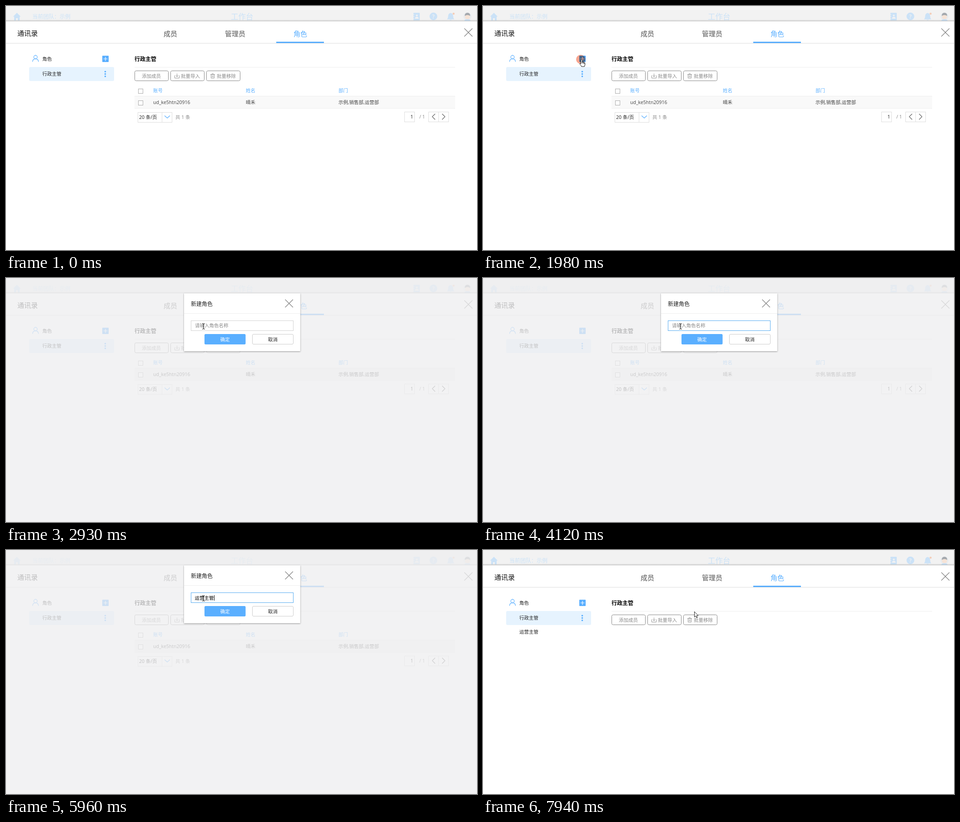
Recreate the animation shown at these times as an HTML page. Size 1037 by 540 pixels, loop 8000 ms.

```html
<!DOCTYPE html>
<html lang="zh-CN">
<head>
<meta charset="utf-8">
<title>新建角色</title>
<style>
html, body { margin: 0; width: 100%; height: 100%; overflow: hidden; background: #fff; }
svg { display: block; width: 1037px; height: 540px; font-family: "Open Sans", "Noto Sans CJK SC", "Noto Sans CJK", sans-serif; }
text { white-space: pre; }
.line { fill: none; stroke-linecap: round; stroke-linejoin: round; }
#ripple { mix-blend-mode: multiply; }
</style>
</head>
<body>
<svg id="stage" viewBox="0 0 1037 540">
  <defs>
    <linearGradient id="edge" x2="0" y2="1">
      <stop stop-color="#888" stop-opacity="0"/><stop offset="1" stop-color="#888" stop-opacity=".4"/>
    </linearGradient>
    <filter id="shadow" x="-10%" y="-10%" width="120%" height="125%">
      <feDropShadow dx="0" dy="1" stdDeviation="1.5" flood-opacity=".4"/>
    </filter>
  </defs>
  <g id="page"></g>
  <g id="table"></g>
  <g id="added"></g>
  <rect id="veil" width="1037" height="540" fill="#efeff0"/>
  <g id="modal"></g>
  <circle id="ripple" fill="#f9a58f"/>
  <g id="cursor">
    <path id="arrow" d="M.5 .5V12.5L3.3 9.9L5.2 14.2L7.1 13.4L5.2 9.2H8.9Z" fill="#fff" stroke="#222"/>
    <path id="hand" d="M.5 1.5Q.5 0 1.8 0T3.2 1.5V6Q5 5 5.6 6.7Q7.2 6 7.7 7.4Q9.5 7 9.5 9V12L8.3 16H1.8Q1 13.5-1.8 10.6Q-2.6 9-1.2 8.7L.5 10Z M3.2 6V9M5.6 6.7V9.5M7.7 7.4V10" fill="#fff" stroke="#111"/>
    <path id="beam" class="line" d="M-2.5-6H-1L0-5L1-6H2.5M0-5V5M-2.5 6H-1L0 5L1 6H2.5" stroke="#111"/>
  </g>
</svg>
<script>
const $ = id => document.getElementById(id);
const BLUE = '#5aafff', PALE = '#cbe2f7';

// x, vertical centre, size, colour, content
const text = (x, cy, size, color, s, extra = '') =>
  `<text x="${x}" y="${cy + size * .38}" font-size="${size}" fill="${color}" ${extra}>${s}</text>`;
const rect = (x, y, w, h, fill, extra = '') =>
  `<rect x="${x}" y="${y}" width="${w}" height="${h}" fill="${fill}" ${extra}/>`;
const frame = (x, y, w, h, stroke, r = 0, id = '') =>
  rect(x + .5, y + .5, w - 1, h - 1, '#fff', `stroke="${stroke}" rx="${r}" id="${id}"`);
const path = (d, stroke, w = 1) => `<path class="line" d="${d}" stroke="${stroke}" stroke-width="${w}"/>`;
const shape = (d, fill) => `<path d="${d}" fill="${fill}"/>`;
const disc = (x, y, r, fill) => `<circle cx="${x}" cy="${y}" r="${r}" fill="${fill}"/>`;
const cross = (x, y, n, color) => path(`M${x} ${y}l${n} ${n}m0-${n}l-${n} ${n}`, color, 1.4);

const header = [
  rect(0, 0, 1037, 34, '#f2f2f2'),
  shape('M15.5 23.5L24 15L32.5 23.5H30V32H26V27H22V32H18V23.5Z', PALE),
  text(58, 23, 12, PALE, '当前团队：示例'),
  text(495, 24, 16.5, PALE, '工作台'),
  rect(897, 15, 14, 17, PALE, 'rx="1"'),
  path('M895.5 19h3m-3 4.5h3m-3 4.5h3', '#f2f2f2', 1.2),
  disc(904.5, 21, 2, '#f2f2f2'), shape('M900.5 28q0-4 4-4t4 4Z', '#f2f2f2'),
  disc(941, 23, 8.5, PALE),
  text(941, 23, 12, '#f2f2f2', '?', 'text-anchor="middle" font-weight="600"'),
  shape('M971 29.5Q973.5 27 973.5 22Q974 16 979 15.5Q984 16 984.5 22Q984.5 27 987 29.5ZM976.5 30.5h5q-2.5 2.5-5 0Z', PALE),
  disc(985.5, 17, 2.3, '#f3cdb8'),
  disc(1016, 23, 9, '#e9ecef'), disc(1016, 24, 5.5, '#f6e3d6'),
  shape('M1010 22q0-7 6-7t6 7q-6-4-12 0Z', '#a4a8ad'),
  shape('M1009 33q1-4 7-4t7 4Z', PALE),
  rect(0, 30, 1037, 4, 'url(#edge)')
];

const sheet = [
  rect(0, 34, 1037, 506, '#fff'),
  text(25, 60, 15, '#111', '通讯录'),
  text(347, 61, 15, '#555', '成员'),
  text(482, 61, 15, '#555', '管理员'),
  text(633, 61, 15, BLUE, '角色'),
  rect(0, 82, 1037, 1, '#ddd'),
  rect(595, 79, 105, 3, BLUE),
  cross(1009.5, 50, 17, '#888'),
  `<circle cx="65" cy="113" r="3.8" fill="none" stroke="${BLUE}" stroke-width="1.2"/>`,
  path('M58.5 123q.5-6.2 6.5-6.2t6.5 6.2', BLUE, 1.2),
  text(80, 117, 10.5, '#222', '角色'),
  rect(212, 110, 14, 14, BLUE, 'id="plus" rx="1"'),
  path('M215 117h8m-4-4v8', '#fff', 1.2),
  rect(51, 135, 187, 31, '#e6f3fe', 'rx="3"'),
  text(80, 150.5, 10.5, '#222', '行政主管'),
  ...[145.3, 150.5, 155.7].map(y => disc(218.5, y, 1.8, BLUE)),
  text(283, 117, 12, '#000', '行政主管', 'font-weight="700"'),
  rect(283, 135, 706, 1, '#eee'),
  ...[283, 362, 441].map(x => frame(x, 143, 75, 23, '#888', 3)),
  text(299, 155, 10.5, '#888', '添加成员'),
  text(385, 155, 10.5, '#888', '批量导入'),
  text(464, 155, 10.5, '#888', '批量移除'),
  path('M371.5 154v5.5h10V154M376.5 150v6.5m-2.5-2.5l2.5 2.5l2.5-2.5', '#888', .9),
  path('M450.5 151.5h9m-6 0v-1.5h3v1.5m-5 0v8h7v-8m-4.5 2.5v3m2 -3v3', '#888', .9)
];

const table = [
  rect(283, 199, 706, 28, '#f9f9f9'),
  rect(283, 199, 706, 1, '#eee'), rect(283, 226, 706, 1, '#eee'),
  frame(291, 183, 11, 11, '#aaa'), frame(291, 209, 11, 11, '#aaa'),
  ...[[324, '账号', 'ud_ke5htn20916'], [528, '姓名', '晴禾'], [732, '部门', '示例,销售部,运营部']]
    .map(([x, head, cell]) => text(x, 187, 10.5, BLUE, head) + text(x, 213, 10.5, '#444', cell)),
  frame(290, 235, 76, 23, '#ddd'), rect(343, 235, 1, 23, '#ddd'),
  text(293, 246, 10.5, '#222', '20 条/页'),
  path('M349.5 243l5.5 5l5.5-5', BLUE, 1.2),
  text(373, 246, 10.5, '#888', '共 1 条'),
  frame(877, 234, 23, 23, '#ddd'), text(890.5, 245.5, 10.5, '#222', '1'),
  text(910, 245.5, 10.5, '#888', '/ 1'),
  frame(930, 234, 45, 23, '#ddd'), rect(952, 234, 1, 23, '#ddd'),
  path('M944.5 239l-6 6l6 6M960.5 239l6 6l-6 6', '#666', 1.2)
];

const modal = [
  rect(392, 34, 256, 128, '#fff', 'filter="url(#shadow)"'),
  text(407, 57, 12, '#222', '新建角色'),
  cross(615, 48, 16.5, '#888'),
  rect(392, 78, 256, 1, '#eee'),
  frame(407, 94, 226, 23, '#d2d2d2', 0, 'field'),
  text(416, 105.5, 10.5, '#888', '请输入角色名称', 'id="hint"'),
  text(415.5, 106, 10.5, '#000', '运营主管', 'id="typed"'),
  rect(0, 100, 1, 12, '#000', 'id="caret"'),
  rect(437, 124, 90.5, 23, BLUE, 'id="ok" rx="2.5"'),
  text(482.3, 136, 10.5, '#fff', '确定', 'text-anchor="middle"'),
  frame(542, 124, 91, 23, '#ccc', 2.5),
  text(587.5, 136, 10.5, '#222', '取消', 'text-anchor="middle"')
];

$('page').innerHTML = header.concat(sheet).join('');
$('table').innerHTML = table.join('');
$('added').innerHTML = text(80, 181, 10.5, '#222', '运营主管');
$('modal').innerHTML = modal.join('');

const LOOP = 8000, STEP = 79.5;
const OPEN = 2210, CLOSE = 7770, FOCUS = 3080, COMMIT = 5790, RELOAD = 7850;
const moves = [[70, 500, 506], [860, 222, 121], [1100, 215, 118], [2220, 215, 118],
  [2900, 435, 106.5], [6770, 435, 106.5], [7220, 465, 136]];
const clicks = [[1730, 2130], [3000, 3240], [7380, 7760]];

const clamp = v => Math.max(0, Math.min(1, v));
const show = (id, on) => $(id).style.display = on ? '' : 'none';
const inside = ([x, y], l, t, r, b) => x >= l && x <= r && y >= t && y <= b;

function pointer(t) {
  let i = 0;
  while (i < moves.length - 2 && t > moves[i + 1][0]) i++;
  const [t0, x0, y0] = moves[i], [t1, x1, y1] = moves[i + 1];
  const u = clamp((t - t0) / (t1 - t0)), k = u * u * (3 - 2 * u);
  return [x0 + (x1 - x0) * k, y0 + (y1 - y0) * k];
}

function draw(t) {
  const open = t >= OPEN && t < CLOSE;
  const fade = open ? clamp((t - OPEN + STEP) / 240) : 0;
  $('veil').style.opacity = .78 * fade;
  show('modal', open);
  $('modal').style.opacity = fade;
  show('table', t < RELOAD);
  show('added', t >= RELOAD);

  const pos = pointer(t);
  const onPlus = !open && inside(pos, 212, 110, 226, 124);
  const onOk = open && inside(pos, 437, 124, 527, 147);
  const onField = open && inside(pos, 407, 94, 633, 117);
  $('plus').setAttribute('fill', onPlus ? '#4a9cf0' : BLUE);
  $('ok').setAttribute('fill', onOk ? '#7bc0ff' : BLUE);

  const focused = t >= FOCUS, typed = t >= COMMIT;
  $('field').setAttribute('stroke', focused ? '#55aaf0' : '#d2d2d2');
  show('hint', !typed);
  show('typed', typed);
  const sinceKey = t - (typed ? 5950 : FOCUS);
  show('caret', focused && Math.floor(Math.max(0, sinceKey) / 515) % 2 === 0);
  $('caret').setAttribute('x', typed ? 458 : 415);

  const click = clicks.find(([a, b]) => t >= a && t < b);
  show('ripple', click);
  if (click) {
    const r = 5 + 5 * clamp((t - click[0]) / 230);
    Object.entries({ cx: pos[0], cy: pos[1], r }).forEach(([k, v]) => $('ripple').setAttribute(k, v));
  }

  show('cursor', t >= 60);
  $('cursor').setAttribute('transform', `translate(${pos.map(Math.round)})`);
  show('hand', onPlus || onOk);
  show('beam', onField);
  show('arrow', !(onPlus || onOk || onField));
}

function tick() {
  const t = performance.now() % LOOP;
  draw(70 + Math.floor((t - 67) / STEP) * STEP);
  requestAnimationFrame(tick);
}
tick();
</script>
</body>
</html>
```
